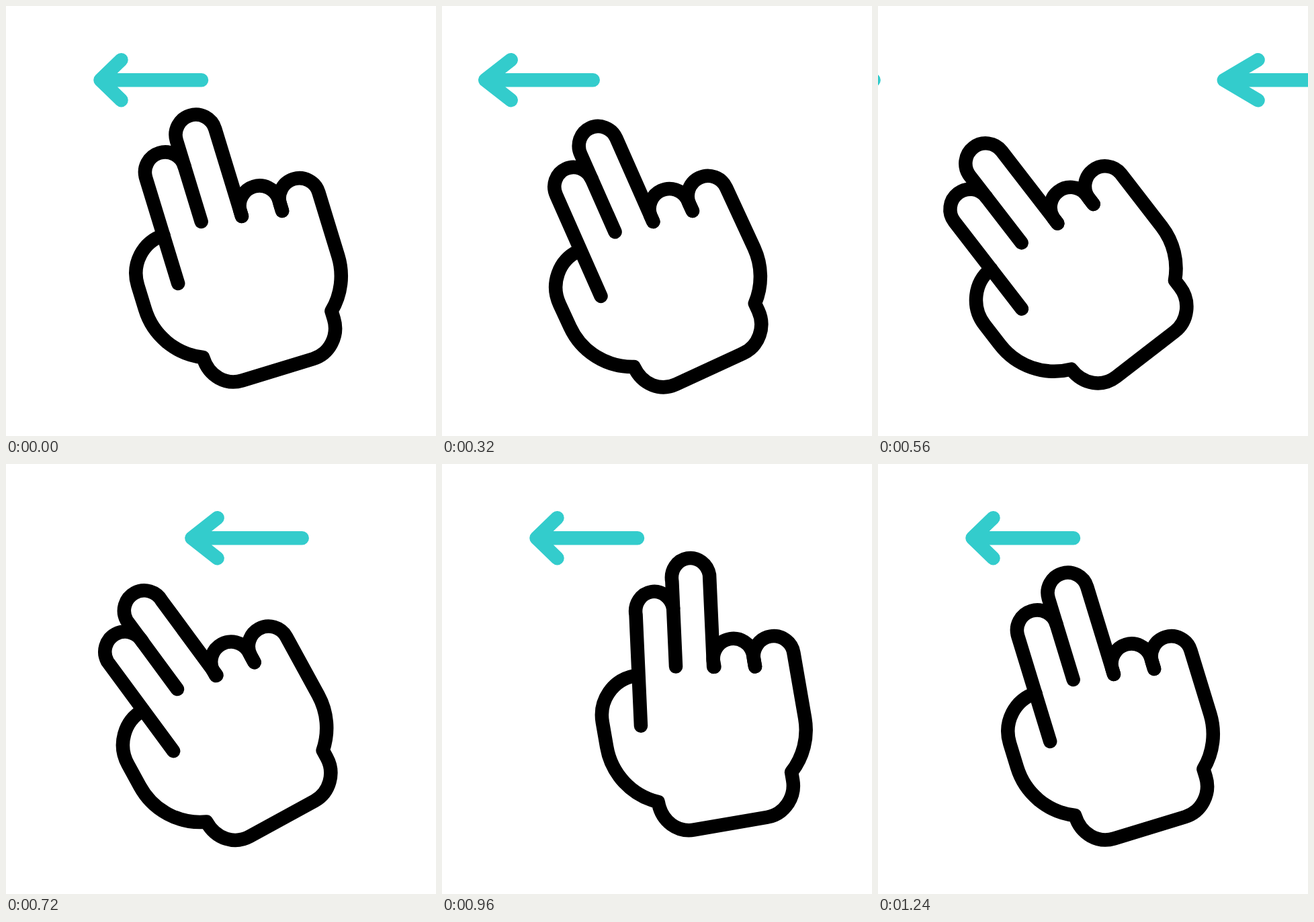
An HTML page that plays this animation: 640x640 px, repeating every 1.48 s.

```html
<!DOCTYPE html>
<html lang="en">
<head>
<meta charset="utf-8">
<title>Two-finger swipe</title>
<style>
  html, body { margin: 0; width: 100%; height: 100%; overflow: hidden; background: #fff; }
  svg { display: block; width: 100vw; height: 100vh; }
  path { fill: none; stroke: #000; stroke-width: 20.5; stroke-linecap: round; stroke-linejoin: round; }
  .arrow { stroke: #3cc; }
</style>
</head>
<body>
<svg viewBox="0 0 640 640">
  <path class="arrow" id="leaving"/>
  <path class="arrow" id="arriving"/>
  <g id="hand">
    <!-- thumb, wrist and little finger, then ring finger -->
    <path d="M-3 -191A59 60 0 0 0 -61.5 -131V-94A102 102 0 0 0 0 0C0 30 21 50 46 50H156C182 50 203 28 203 2V-10A102 102 0 0 0 236.5 -85.6V-184.5A30 30 0 0 0 176.5 -184.5V-174"/>
    <path d="M116.7 -184V-193.5A30 30 0 0 1 176.5 -193.5V-174"/>
    <path id="middle"/>
    <path id="index"/>
  </g>
</svg>
<script>
const LOOP = 1480, STEP = 40;
const REST = -17, WOUND = -2.9, SWUNG = -37.7, OVER = -9.8;
const $ = id => document.getElementById(id);
const setPath = (id, d) => $(id).setAttribute('d', d);

function ease(t, start, end) {
  const u = Math.min(1, Math.max(0, (t - start) / (end - start)));
  return (1 - Math.cos(Math.PI * u)) / 2;
}

// Eased value through a few [time, value] keys
const track = (t, ...keys) => keys.reduce((sum, [time, value], k) =>
  k ? sum + (value - keys[k - 1][1]) * ease(t, keys[k - 1][0], time) : value, 0);

const arrow = (tip, wing, tail) =>
  `M${wing} 80.2L${tip} 110.2L${wing} 140.2M${tip} 110.2H${tail}`;

function drawArrows(t) {
  const out = ease(t, 190, 615), rest = 1 - ease(t, 379, 899);
  setPath('leaving', arrow(140.5 - 357 * out, 171.5 - 322 * out, 291 - 310 * out));
  setPath('arriving', arrow(140.5 + 513 * rest, 171.5 + 540 * rest, 291 + 565 * rest));
  $('leaving').style.display = out < 1 ? '' : 'none';
}

function drawHand(t) {
  const angle = track(t, [40, REST], [180, WOUND], [420, SWUNG], [570, SWUNG], [960, OVER], [1240, REST]);
  const x = track(t, [40, 341], [180, 338], [420, 327], [560, 327], [960, 371], [1240, 341]);
  const y = track(t, [40, 508.4], [180, 508], [320, 516], [560, 510], [660, 510], [960, 494.5], [1240, 508.4]);
  $('hand').setAttribute('transform', `translate(${x} ${y}) rotate(${angle}) translate(-50 0)`);

  // The two long fingers shear about the knuckles and squeeze together
  const lean = track(t, [40, 0], [180, 3], [560, 0], [720, -17], [960, 16], [1240, 0]);
  const pinch = track(t, [40, 0], [160, 6], [560, 0], [700, 0], [960, 7], [1240, 0]);
  const at = (side, height) => side + lean * (height - 194) / 126;
  const outer = -3.2 + pinch, mid = 56.7 + pinch / 2, inner = 116.7;
  const cap = (right, left, height) => {
    const r = at(right, height), l = at(left, height);
    return `${r} ${-height}A${(r - l) / 2} 30 0 0 0 ${l} ${-height}`;
  };
  setPath('middle', `M${at(inner, 184)} -184L${cap(inner, mid, 320)}L${mid} -194`);
  setPath('index', `M${cap(mid, outer, 280)}L${at(outer, 116)} -116`);
}

const begin = performance.now();
function tick() {
  const elapsed = (performance.now() - begin) % LOOP;
  const t = Math.floor(elapsed / STEP) * STEP;
  drawArrows(t);
  drawHand(t);
  requestAnimationFrame(tick);
}
tick();
</script>
</body>
</html>
```
